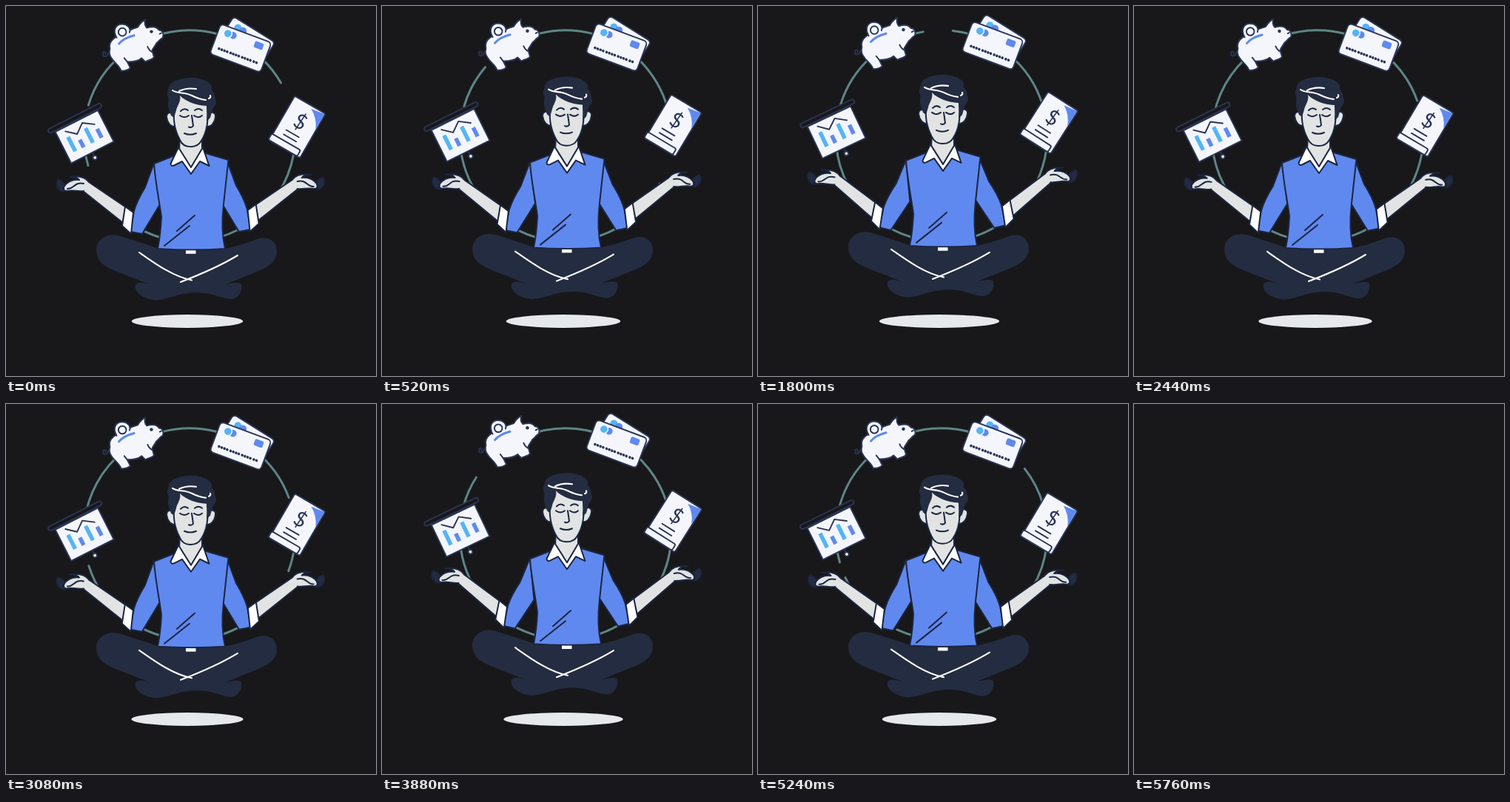
An HTML page for the animation above (5800 ms loop, 500 by 500 pixels).

```html
<!DOCTYPE html>
<html lang="en">
<head>
<meta charset="utf-8">
<title>Calm money juggling</title>
<style>
html, body { margin: 0; height: 100%; overflow: hidden; background: #18181a; }
svg { display: block; width: 100vw; height: 100vh; }
.ink { stroke: #1c2540; stroke-width: 2; stroke-linejoin: round; stroke-linecap: round; }
.item { fill: #f4f6fc; stroke: #2b3454; stroke-width: 1.9; stroke-linejoin: round; stroke-linecap: round; }
.line { fill: none; }
.sky { fill: #53b5f5; stroke: none; }
.blue { fill: #5f89ef; }
.flat { stroke: none; }
.skin { fill: #e1e4e3; }
.white { fill: #fff; }
.navy { fill: #242c41; }
.dark { fill: #2b3454; stroke: none; }
.shine { fill: none; stroke: #fff; stroke-width: 2.1; stroke-linecap: round; }
.slot { fill: none; stroke: #5f89ef; stroke-width: 3; }
</style>
</head>
<body>
<svg viewBox="0 0 500 500">
  <defs>
    <g id="arm" class="ink">
      <path class="skin" d="M109 236L162 272L158 293L104 250Z"/>
      <path class="skin" d="M112 238C107 231 99 229 86 231C92 231 97 232 99 235C90 234 83 238 79 243C77 247 78 250 82 250C90 248 96 251 105 250"/>
      <path class="line" d="M83 247C92 248 92 237 105 240"/>
      <path class="navy" d="M70 235C66 242 71 251 79 251C76 247 77 244 80 241C77 240 76 235 70 235Z"/>
      <path class="blue" d="M200 212L188 245Q177 263 173 277L168 305L184 308L208 268Z"/>
      <path class="white" d="M161 271L172 279L169 308L157 297Z"/>
    </g>
  </defs>
  <g id="scene">
    <ellipse id="shadow" cx="245" cy="426" ry="9" fill="#e6e8eb"/>
    <circle id="ring" cx="248" cy="175.500" r="142.800" fill="none" stroke="#5f8585" stroke-width="3"
      stroke-linecap="round" pathLength="360" stroke-dasharray="153.1 16.2 24.4 8.8 133 24.5"/>

    <g id="board" class="item">
      <path class="line" d="M0 23V30"/>
      <circle cy="31.300" r="2.800"/>
      <rect x="-32" y="-24" width="64.500" height="47.500"/>
      <rect x="-40" y="-31.500" width="80" height="6" rx="3" fill="#18181a"/>
      <path class="sky" d="M-22.500-10h5.500v21.500h-5.500zM4-10h5.500v22h-5.500z"/>
      <path class="blue flat" d="M-10 .5h5.500v11.500h-5.500zM17.500-2h5.500v13.500h-5.500z"/>
      <path class="line" d="M-19.500-18.500L-7-8L6-18.300L20-9"/>
    </g>

    <g id="pig" class="item">
      <path class="line" d="M139 63C137 70 130 69 132 63C133 61 137 62 135 65"/>
      <path d="M141 58C138 46 150 41 162 36C168 32 174 30 178 29Q182 22 188 19Q186 26 190 30C197 28 203 28 206 33C211 33 213 39 211 43C207 45 206 48 203 50C201 54 198 57 197 60L199.500 69C197 73 192 72 188 75L183 70C178 75 170 75 164 75L168 83C165 87 160 87 156 87C153 79 147 77 143 70Q139 65 141 58Z"/>
      <path d="M150 43C144 33 149 25 157 25C165 25 169 31 167 36"/>
      <circle cx="157.500" cy="35.500" r="5.200"/>
      <path class="line" d="M191 55Q193 60 197 62M160 70L164 75M207 38L209 37"/>
      <path class="slot" d="M153 51C158 45 165 42 173 40"/>
      <circle class="dark" cx="196" cy="35" r="2.200"/>
    </g>

    <g id="cards" class="item">
      <g transform="translate(324.500 49.500) rotate(32)">
        <rect x="-33" y="-21" width="66" height="42" rx="5"/>
        <circle class="sky" cx="-20" cy="-11" r="5"/>
        <circle class="blue flat" cx="-12" cy="-11" r="5"/>
      </g>
      <g transform="translate(317 57) rotate(20.500)">
        <rect x="-36.500" y="-21.500" width="73" height="43" rx="5"/>
        <circle class="blue flat" cx="-15.500" cy="-12.500" r="4.800"/>
        <circle class="flat" cx="-23" cy="-12.500" r="6.300"/>
        <circle class="sky" cx="-23" cy="-12.500" r="4.800"/>
        <rect class="blue flat" x="15.500" y="-16.500" width="12.500" height="9" rx="2"/>
        <g id="dots" class="dark"></g>
      </g>
    </g>

    <g id="paper" class="item">
      <rect x="-24" y="-34" width="48" height="69" rx="2.500"/>
      <path class="blue flat" d="M4-30L23-33V-9Q17-23 4-30Z"/>
      <rect x="-25.500" y="25.500" width="45" height="9.500" rx="2.500"/>
      <path class="line" d="M-11 11.500H8.500M-11 18.500H8.500"/>
      <text class="dark" y="2" text-anchor="middle" font-family="Lato, sans-serif" font-size="28">$</text>
    </g>

    <g id="body">
      <use href="#arm" class="arm"/>
      <g transform="translate(498.700 -3) scale(-1 1)"><use href="#arm" class="arm"/></g>
      <path class="navy" d="M204 327C190 322 174 317 158 312C138 304 122 315 122 330C123 347 134 352 150 359L196 377C190 375 178 371 175 377C172 388 190 398 204 397.500C220 397 236 386 262 387.500C282 388 294 397 305 396C315 395 320 384 318 376C314 372 304 375 297 376L344 357C360 350 366 342 366 331C365 315 351 309 334 317C318 323 308 325 296 328Z"/>
      <path class="shine" d="M180 333C200 347 226 366 251 370.500M313 337C290 351 262 363 236 373"/>
      <g class="ink">
        <path class="blue" d="M228 202L200 213C202 240 207 262 210 285Q209 308 205 328Q250 331 296 328C292 311 291 295 294 268L300.500 208L270 199Z"/>
        <path class="line" d="M231 304L255 283M214 324L248 297"/>
        <path class="skin" d="M235 176L234 195L250 219L265 194L265 176Z"/>
        <path class="white" d="M233 191L222.500 213Q223 217 227 215.500L238 210L250 227L262 210L274.500 216L266 191L250 218Z"/>
        <path class="skin" d="M228 147C223 142 217 144 217 150C218 158 223 164 229 163ZM272 147C277 141 284 144 283 150C282 158 277 164 271 163Z"/>
        <path class="skin" d="M228 135C225 152 228 168 235 181C240 193 258 193 264 182C272 170 274 153 272 133L250 115L235 117Z"/>
      </g>
      <rect x="243" y="330.300" width="13.500" height="4.500" fill="#fff"/>
      <path class="navy" d="M223 148L219 136C218 130 221 126 218.500 122C216 118 220 113 220 110C221 102 235 97 250 97C268 97 281 105 278 114C284 118 281 123 284 128C285 133 280 136 279 140L276 151L271 156Q272 146 271 135C257 134 244 130 235 121C237 129 231 135 230 141L227 151Z"/>
      <path class="shine" d="M225 114C232 119 241 116 251 121Q261 126 270 127M234 115Q244 110 257 112M276 121Q277 124 274 125"/>
      <path class="ink line" d="M236 142Q241 137 246 141M255 141Q260 137 265 141M235 148Q241 152.500 247 148M254 148Q260 152.500 265 148M251 148L253 162Q251 165 247 163.500M241 172Q249 175.500 257 172"/>
    </g>
  </g>
</svg>
<script>
const LOOP = 5800, TURN = 5760, BOB = 2880;
const el = id => document.getElementById(id);
const place = (node, value) => node.setAttribute("transform", value);
const arms = document.querySelectorAll(".arm");

// Card number: groups of four dots
el("dots").innerHTML = Array.from({ length: 14 }, (_, i) =>
  `<circle cx="${-27 + i * 3.9 + Math.floor(i / 4) * 1.1}" cy="10.8" r="1.8"/>`).join("");

function draw() {
  const t = performance.now() % LOOP;
  const lift = (1 - Math.cos(2 * Math.PI * t / BOB)) / 2;

  el("scene").style.visibility = t < TURN ? "visible" : "hidden";
  el("shadow").setAttribute("rx", 75.2 + 6.9 * lift);
  place(el("ring"), `rotate(${360 * t / TURN - 5.7} 248 175.5)`);
  place(el("body"), `translate(0 ${-4.8 * lift})`);
  arms.forEach(arm => place(arm, `rotate(${3.2 * lift} 200 212)`));
  place(el("board"), `translate(106 ${177 - 7 * lift}) rotate(${-27 + 2 * lift})`);
  place(el("paper"), `translate(394 ${163 - 6.5 * lift}) rotate(${30 + 3 * lift})`);
  place(el("pig"), `translate(172 ${54 - 3 * lift}) scale(1.02) translate(-172 -54)`);
  place(el("cards"), `translate(0 ${-4 * lift})`);
  requestAnimationFrame(draw);
}
draw();
</script>
</body>
</html>
```
